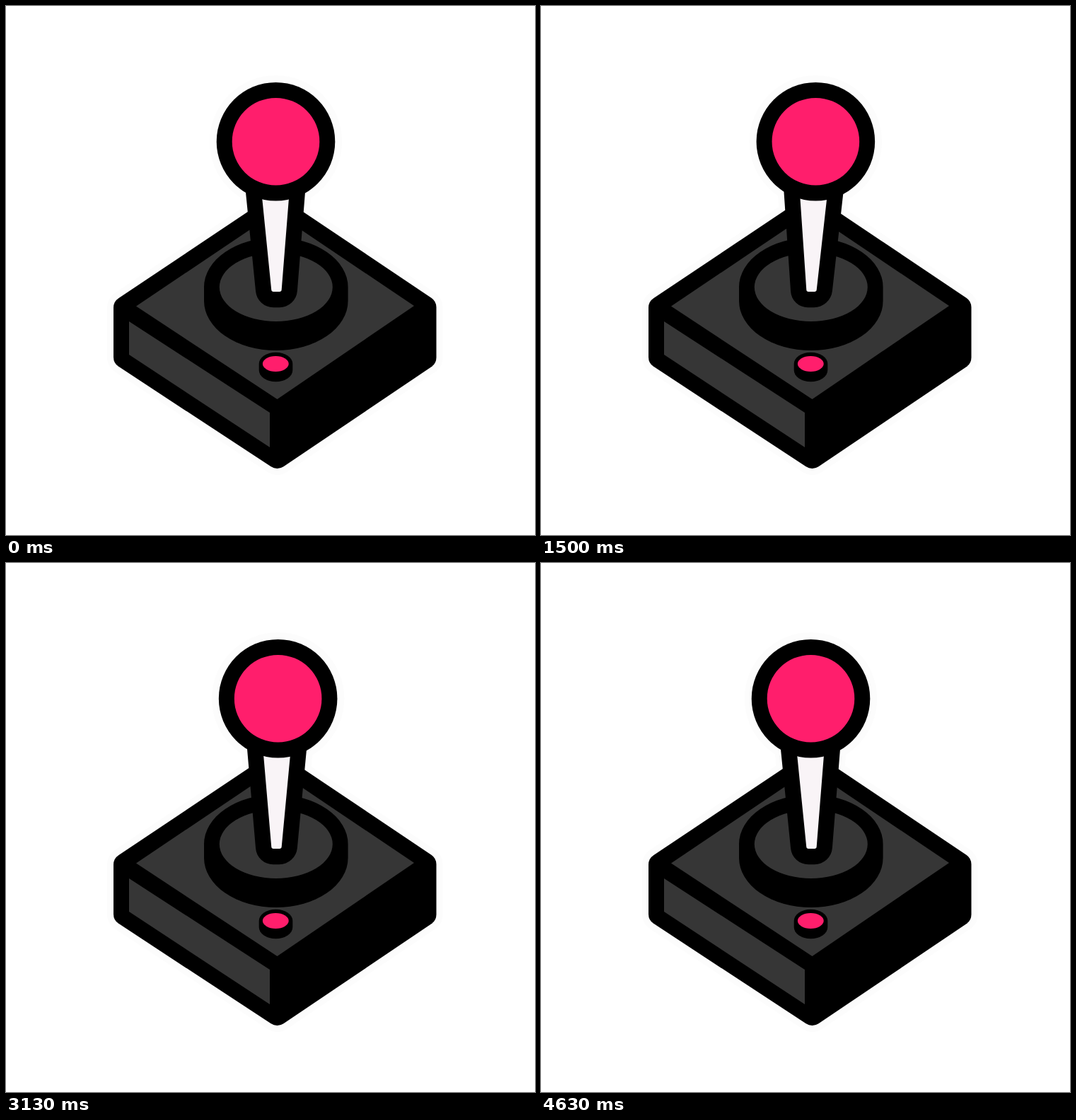
Recreate the animation shown at these times as an HTML page. Size 748 px wide and 748 px high, loop 5010 ms.

```html
<!DOCTYPE html>
<html lang="en">
<head>
<meta charset="utf-8">
<title>Joystick</title>
<style>
  html, body { margin: 0; width: 100%; height: 100%; overflow: hidden; background: #fff; }
  svg { display: block; width: 100%; height: 100%; stroke-linejoin: round; }
  .halo { fill: #fcfcfc; stroke: #fcfcfc; }
  .dark { fill: #363636; }
  .pink { fill: #ff1e6c; }
</style>
</head>
<body>
<svg viewBox="0 0 748 748">
  <defs>
    <path id="box" d="M168 426.5L381 284L592.5 426V497L383.5 638L168 496.5Z"/>
    <path id="shaft" d="M361 230H400.3L386.7 401H378.2Z"/>
  </defs>

  <!-- pale sticker edge -->
  <g class="halo">
    <use href="#box" stroke-width="50"/>
    <use href="#shaft" class="lean" stroke-width="68"/>
    <circle class="knob" cx="381.5" cy="191.7" r="93"/>
  </g>

  <use href="#box" stroke="#000" stroke-width="32"/>
  <path class="dark" d="M184 424.5L381 292L577 424L383.5 556Z"/>
  <path class="dark" d="M174 446L373 575V624L174 493Z"/>

  <path d="M280 397.5A101.8 70 0 0 1 483.6 397.5V417A101.8 70 0 0 1 280 417Z"/>
  <ellipse class="dark" cx="381.8" cy="397.5" rx="80" ry="48.5"/>

  <path id="button"/>
  <ellipse id="cap" class="pink" cx="381.3" cy="506" rx="18.4" ry="10.9"/>

  <g class="lean">
    <use href="#shaft" stroke="#000" stroke-width="50.5"/>
    <use href="#shaft" fill="#f9f4f7" stroke="#f9f4f7" stroke-width="6"/>
  </g>
  <g class="knob">
    <circle cx="381.5" cy="191.7" r="83.8"/>
    <circle class="pink" cx="381.5" cy="191.7" r="61.8"/>
  </g>
</svg>
<script>
  const LOOP = 5010;
  // times in ticks of 50 ms
  const PRESSES = [0, 7.6, 40, 80, 87];
  const SWINGS = [13, 53];
  const SWING = [[-0.1, 0], [6.3, -20], [13, 20], [19.6, 0]];
  const PRESS = [[0, 0], [3, 5], [6, 0]];

  const button = document.getElementById('button');
  const cap = document.getElementById('cap');
  const leans = document.querySelectorAll('.lean');
  const knobs = document.querySelectorAll('.knob');

  const smooth = p => p * p * (3 - 2 * p);

  function track(keys, t) {
    for (let i = 1; i < keys.length; i++) {
      const [t0, a] = keys[i - 1], [t1, b] = keys[i];
      if (t >= t0 && t < t1) return a + (b - a) * smooth((t - t0) / (t1 - t0));
    }
    return 0;
  }

  const sum = (starts, keys, t) => starts.reduce((s, start) => s + track(keys, t - start), 0);

  function draw(ms) {
    // 20 poses a second, shown on a 30 fps grid
    const tick = Math.round(Math.floor((ms + 5) * 0.03) * 2 / 3);
    const dx = sum(SWINGS, SWING, tick);
    const dy = sum(PRESSES, PRESS, tick);
    const k = -dx / 211.5;

    leans.forEach(el => el.setAttribute('transform', `matrix(1 0 ${k} 1 ${-k * 403} 0)`));
    knobs.forEach(el => el.setAttribute('transform', `translate(${dx} 0)`));
    cap.setAttribute('cy', 506 + dy);
    button.setAttribute('d',
      `M357.7 ${506 + dy}A23.8 16.2 0 0 1 405.3 ${506 + dy}V515A23.8 16.2 0 0 1 357.7 515Z`);
  }

  const start = performance.now();
  function loop() {
    draw((performance.now() - start) % LOOP);
    requestAnimationFrame(loop);
  }
  loop();
</script>
</body>
</html>
```
